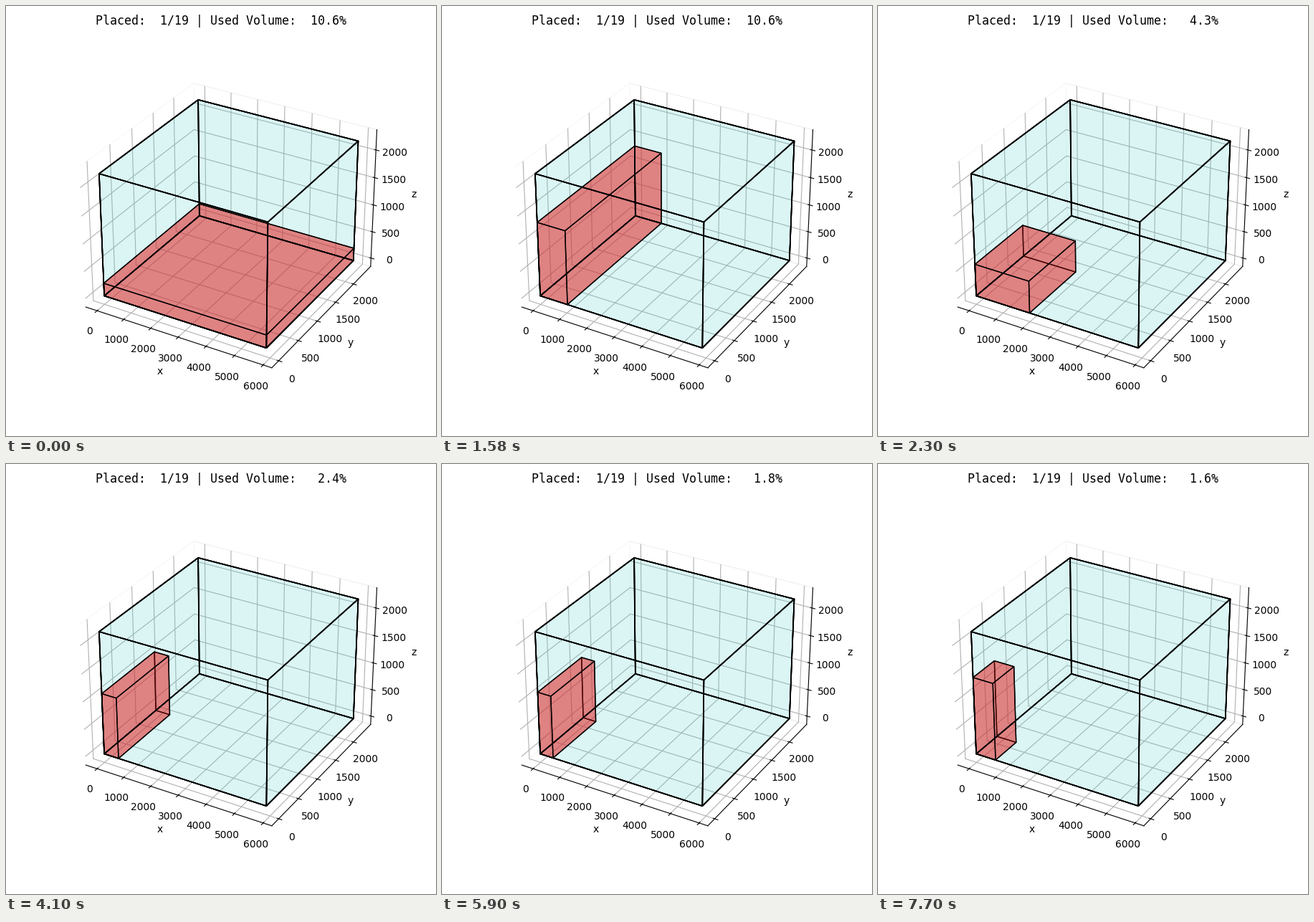
Recreate the animation shown at these times as a matplotlib script. Size 600 by 600 pixels, loop 8 s.

```python
import matplotlib.pyplot as plt
import numpy as np
from matplotlib.animation import FuncAnimation
from mpl_toolkits.mplot3d.art3d import Poly3DCollection

LOOP_MS, STEP_MS = 8000, 100
FIRST_CHANGE_MS, HOLD_MS = 500, 1800

CONTAINER = (5870, 2330, 2200)
ITEM_COUNT = 19
# Size of the item tried first in each packing attempt
ITEMS = [
    (5870, 2330, 234),
    (1023, 2330, 1343),
    (1992, 1114, 584),
    (539, 1220, 1105),
    (486, 1009, 1131),
    (728, 479, 1395),
]

CONTAINER_FILL = (72 / 255, 209 / 255, 204 / 255, 0.1)
ITEM_FILL = (228 / 255, 26 / 255, 28 / 255, 0.31)


def box_faces(size):
    """Six quads of a box with one corner at the origin."""
    faces = []
    for axis in range(3):
        a, b = (axis + 1) % 3, (axis + 2) % 3
        for side in (0, 1):
            quad = np.zeros((4, 3))
            quad[:, axis] = side
            quad[:, a] = [0, 1, 1, 0]
            quad[:, b] = [0, 0, 1, 1]
            faces.append(quad * size)
    return faces


def add_box(size, fill, zorder, width=1.0):
    box = Poly3DCollection(box_faces(size), facecolors=[fill], edgecolors=["black"],
                           linewidths=width, zorder=zorder)
    ax.add_collection3d(box)
    return box


def padded(length):
    pad = length * (1.1 * 25 / 24 - 1) / 2
    return -pad, length + pad


fig = plt.figure(figsize=(6, 6), dpi=100)
ax = fig.add_subplot(projection="3d", computed_zorder=False)
ax.set_xlim(*padded(CONTAINER[0]))
ax.set_ylim(*padded(CONTAINER[1]))
ax.set_zlim(*padded(CONTAINER[2]))
ax.set(xlabel="x", ylabel="y", zlabel="z")
for axis in (ax.xaxis, ax.yaxis, ax.zaxis):
    axis.pane.set_fill(False)

add_box(CONTAINER, CONTAINER_FILL, zorder=1)
item = add_box(ITEMS[0], ITEM_FILL, zorder=2)
add_box(CONTAINER, (0, 0, 0, 0), zorder=3, width=1.2)
title = fig.suptitle("", family="DejaVu Sans Mono")


def update(frame):
    elapsed = frame * STEP_MS - FIRST_CHANGE_MS
    size = ITEMS[elapsed // HOLD_MS + 1]
    used = 100 * np.prod(np.divide(size, CONTAINER))
    item.set_verts(box_faces(size))
    title.set_text(f"Placed: {1:2d}/{ITEM_COUNT} | Used Volume: {used:5.1f}%")
    return item, title


anim = FuncAnimation(fig, update, frames=LOOP_MS // STEP_MS,
                     interval=STEP_MS, repeat=True, repeat_delay=0)
plt.show()
```
